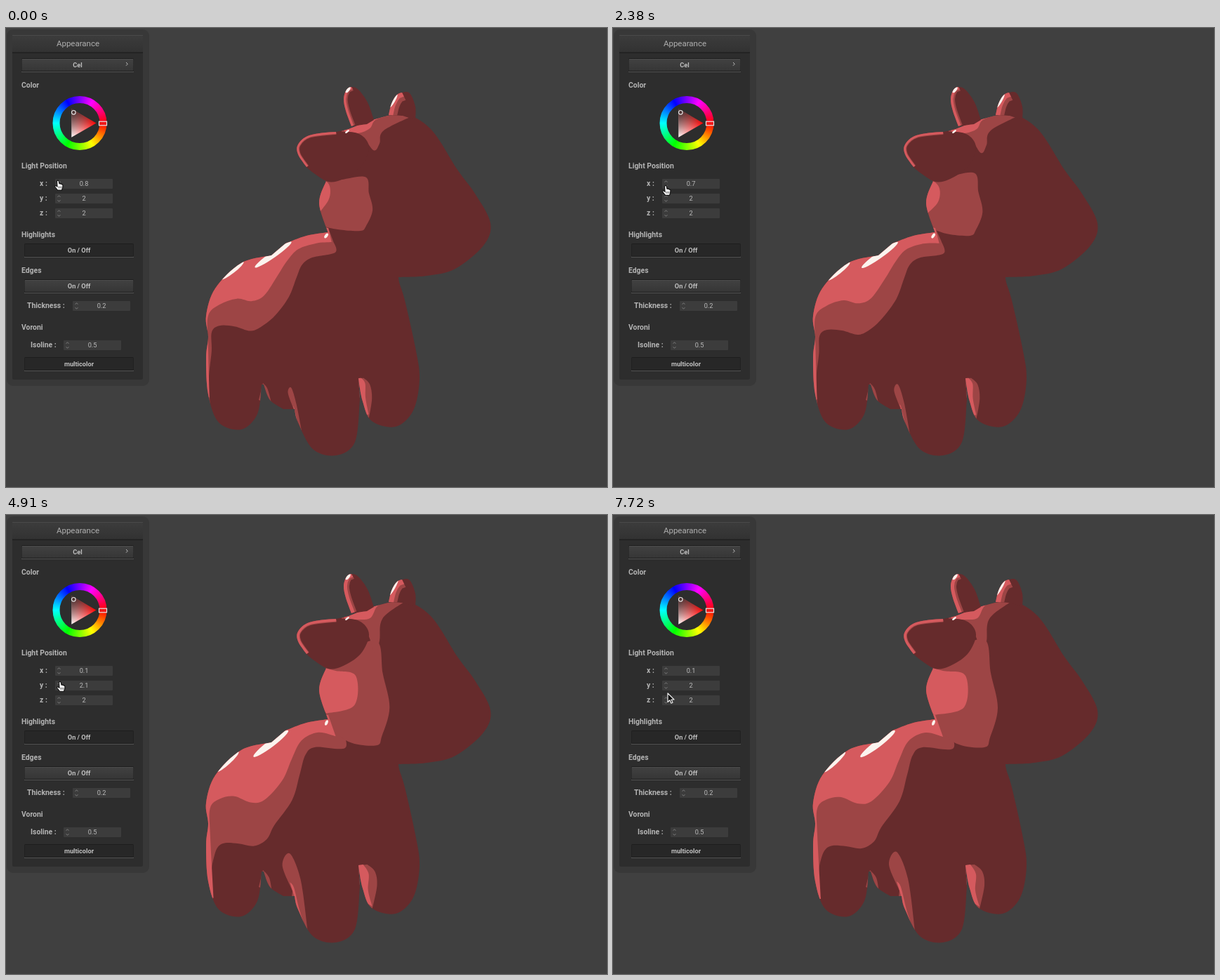
These frames come from a looping animation (856 px wide and 654 px high, 8000 ms). An HTML page with a canvas:

```html
<!DOCTYPE html>
<html lang="en">
<head>
<meta charset="utf-8">
<title>Cel shading</title>
<style>
html, body { margin: 0; width: 100%; height: 100%; overflow: hidden; background: #404040; }
canvas { display: block; }
</style>
</head>
<body>
<canvas id="stage" width="856" height="654"></canvas>
<script>
const ctx = document.getElementById('stage').getContext('2d');
const LOOP = 8000;
const DARK = '#662b2c', MID = '#9d4545', LIGHT = '#d55a5e', WHITE = '#fbf3ee';

// Each click on a spinner arrow changes its value by 0.1
const xUp = [450, 750, 900];
const xDown = [1790, 2090, 2240, 2380, 2520, 2820, 2970, 3420, 3720, 3870];
const yUp = [4910, 5350, 5500, 5790];
const yDown = [6830, 6980, 7130, 7280];
const clicks = (times, t) => times.filter(time => time <= t).length;
const spinner = (value, up, down, t) => (value * 10 + clicks(up, t) - clicks(down, t)) / 10;

// [time, x, y]
const cursorPath = [[1050, 74, 217], [1350, 75, 224], [4170, 75, 225], [4760, 77, 237],
  [5940, 77, 239], [6680, 77, 245], [7430, 77, 245], [7720, 78, 254]];
const mix = (a, b, k) => a.map((v, i) => v + (b[i] - v) * k);

function cursorAt(t) {
  const next = cursorPath.findIndex(key => key[0] > t);
  if (next < 1) return cursorPath.at(next).slice(1);
  const a = cursorPath[next - 1], b = cursorPath[next];
  return mix(a, b, (t - a[0]) / (b[0] - a[0])).slice(1);
}

const points = text => text.trim().split(/\s+/).map(p => p.split(',').map(Number));

// Catmull-Rom through every point of an open run
function curve(path, p) {
  for (let i = 0; i < p.length - 1; i++) {
    const a = p[i - 1] || p[i], b = p[i], c = p[i + 1], d = p[i + 2] || c;
    path.bezierCurveTo(b[0] + (c[0] - a[0]) / 6, b[1] + (c[1] - a[1]) / 6,
      c[0] - (d[0] - b[0]) / 6, c[1] - (d[1] - b[1]) / 6, c[0], c[1]);
  }
}
// Smooth runs separated by "/" meet in corners
function outline(text) {
  const path = new Path2D();
  text.split('/').map(points).forEach((run, i) => {
    path[i ? 'lineTo' : 'moveTo'](...run[0]);
    curve(path, run);
  });
  return path;
}

const torso = outline(`456,218 428,198 415,170 432,153 470,148 488,144 / 521,131 566,123 605,144 643,202 668,236
  690,278 680,310 640,343 600,353 559,355 / 459,292 446,250 456,218`);
torso.addPath(outline(`459,291 / 540,290 / 559,350 560,362 568,388 583,455 589,500 580,545 555,568 521,560 508,532 502,500 /
  504,530 497,590 470,609 437,600 416,562 411,543 / 395,543 376,530 367,508 / 364,508 358,550 335,572 303,562 288,522
  285,470 288,440 285,410 298,371 335,335 378,324 / 398,307 428,296 459,291`));

// Parts in front: the outline starts with the lit edge
function part(edge, rest) {
  return { edge: outline(edge), body: outline(edge + ' ' + rest) };
}
const ear1 = part('492,140 484,118 481,101 485,88 492,84', '502,88 515,106 524,131 / 514,137 492,140');
const ear2 = part('545,124 549,108 556,96 564,92', '575,93 583,112 583,131 / 565,125 545,124');
const brow = part('428,198 416,180 416,166 432,153 470,148', '503,151 517,170 505,198 478,216 456,218 428,198');

// Shaded areas slide from their place at light x = 1 to that at x = 0.1; "close" completes them off the model
const areas = [
  { color: MID, ease: 1.2, close: '459,285 430,280 270,300 270,546',
    from: '291,546 288,500 292,455 291,425 302,415 324,416 348,423 366,415 385,401 402,378 413,352 421,336 436,326 466,317 463,303',
    to: '295,547 293,510 297,488 303,476 313,471 332,472 354,475 372,465 382,445 408,408 419,370 427,342 441,331 484,333 480,305' },
  { color: MID, ease: .8, close: '440,260',
    from: '450,215 466,228 504,227 508,240 511,253 502,268 494,271 470,271 452,276',
    to: '450,215 490,190 530,178 538,225 548,275 537,317 529,331 490,326 457,300' },
  { color: MID, close: '560,118 480,132',
    from: '478,148 505,152 523,167 532,160 538,146 582,126',
    to: '478,148 512,165 526,200 532,180 536,148 566,124' },
  { color: MID, close: '400,592 405,560',
    from: '410,545 404,526 407,522 412,542 421,582',
    to: '408,535 393,498 404,480 420,518 430,592' },
  { color: MID, close: '512,552 504,528 502,499',
    from: '508,499 516,508 519,528 515,556',
    to: '515,498 526,508 529,528 522,562' },
  { color: MID, close: '360,530', from: '366,506 372,514 379,538', to: '366,506 375,517 379,538' },
  { color: LIGHT, close: '459,285 430,280 270,300 270,546',
    from: '288,520 287,450 287,408 304,391 330,381 350,383 368,373 386,343 399,326 415,313 440,306 462,302',
    to: '296,547 291,455 291,418 305,405 325,402 348,411 368,408 394,380 407,350 421,322 445,310 470,316' },
  { color: LIGHT, ease: 1.6, close: '440,260',
    from: '445,215 457,220 458,232 455,243 446,260',
    to: '445,215 470,222 502,229 500,274 457,285' },
  { color: LIGHT, close: '540,115 480,135',
    from: '482,149 503,150 518,142 526,131 555,123',
    to: '482,149 500,149 519,147 529,130 545,123' },
  { color: LIGHT, close: '411,590 411,545',
    from: '410,543 411,546 414,560 418,575',
    to: '404,522 410,530 418,562 427,590' },
  { color: LIGHT, close: '512,552 504,528 502,499',
    from: '505,499 510,505 511,525 515,548',
    to: '509,498 517,512 516,535 522,558' }
];
for (const area of areas) for (const key of ['from', 'to', 'close']) area[key] = points(area[key]);

// Highlights: [center x, center y, half length, half width, angle]
const highlights = [
  { from: [324.5, 344, 20, 3.5, -.64], to: [315.5, 352, 21, 3.8, -.75] },
  { from: [381.5, 322, 32, 4.3, -.6], to: [377, 326, 31, 5, -.65] },
  { from: [456, 296, 4, 2, -.9], to: [456.5, 296, 4, 2, -1.2] }
];

function shape({ from, to, close, ease = 1 }, k) {
  const eased = Math.sign(k) * Math.abs(k) ** ease;
  const p = from.map((q, i) => mix(q, to[i], eased));
  const path = new Path2D();
  path.moveTo(...p[0]);
  curve(path, p);
  close.forEach(q => path.lineTo(...q));
  return path;
}

function fill(path, color) {
  ctx.fillStyle = color;
  ctx.fill(path);
}
function ellipse(x, y, length, width, angle) {
  ctx.fillStyle = WHITE;
  ctx.beginPath();
  ctx.ellipse(x, y, length, width, angle, 0, 7);
  ctx.fill();
}

function drawPart({ edge, body }, midWidth, lightWidth, shine) {
  fill(body, DARK);
  ctx.save();
  ctx.clip(body);
  for (const [width, color] of [[midWidth, MID], [lightWidth, LIGHT]]) {
    ctx.strokeStyle = color;
    ctx.lineWidth = 2 * width;
    ctx.stroke(edge);
  }
  if (shine) ellipse(...shine);
  ctx.restore();
}

function drawModel(x, y) {
  // Raising the light darkens the model like moving it sideways
  const k = (1 - x - (y - 2) / 2) / .9;
  fill(torso, DARK);
  ctx.save();
  ctx.clip(torso);
  areas.forEach(area => fill(shape(area, k), area.color));
  highlights.forEach(({ from, to }) => ellipse(...mix(from, to, k)));
  ctx.restore();
  drawPart(ear1, 5 + 3 * k, 3 + 2 * k, [487, 88, 5, 2.3, -.9]);
  drawPart(ear2, 12, 6 + k, [552, 104, 10 + 3 * k, 2, -1.05]);
  drawPart(brow, 3.5 + k, 2.5 + k);
  ellipse(486, 147.5, 3.5, 1.4, -.7);
}

function box(x, y, w, h, color, radius = 0) {
  ctx.fillStyle = color;
  ctx.beginPath();
  ctx.roundRect(x, y, w, h, radius);
  ctx.fill();
}
function label(text, x, y, size = 10.4, weight = 700, align = 'left', color = '#b4b4b4') {
  ctx.font = `${weight} ${size}px Roboto, sans-serif`;
  ctx.textAlign = align;
  ctx.fillStyle = color;
  ctx.fillText(text, x, y);
}
function line(color, width, ...p) {
  ctx.strokeStyle = color;
  ctx.lineWidth = width;
  ctx.beginPath();
  p.forEach(q => ctx.lineTo(...q));
  ctx.stroke();
}
function vertical(y, h, top, bottom) {
  const g = ctx.createLinearGradient(0, y, 0, y + h);
  g.addColorStop(0, top);
  g.addColorStop(1, bottom);
  return g;
}
function button(text, x, y, pushed) {
  const w = 182 - x;
  box(x, y, w, 19, '#1d1d1d', 2);
  box(x, y + 19, w, 1, '#545454');
  box(x + .5, y + 1, w - 1, 17, pushed ? '#272727' : vertical(y, 18, '#424242', '#363636'), 1);
  if (!pushed) box(x + 1, y + 1, w - 2, 1, '#4c4c4c');
  label(text, x + w / 2, y + 13, 9.2, 700, 'center', '#c0c0c0');
}
function field(text, x, y) {
  box(x, y, 82, 14, '#3c3c3c', 1);
  for (const [dy, s] of [[4.5, -1.5], [9.5, 1.5]])
    line('#858585', .9, [x + 3.5, y + dy], [x + 5.5, y + dy + s], [x + 7.5, y + dy]);
  label(text, x + 41, y + 10.4, 9.2, 400, 'center', '#bdbdbd');
}

function drawWheel() {
  const cx = 105, cy = 135.5, r = 23.5;
  const hues = ctx.createConicGradient(0, cx, cy);
  for (let i = 0; i <= 6; i++) hues.addColorStop(i / 6, `hsl(${i * 60}, 100%, 50%)`);
  ctx.strokeStyle = hues;
  ctx.lineWidth = 10;
  ctx.beginPath();
  ctx.arc(cx, cy, 33.5, 0, 7);
  ctx.stroke();

  const [hue, white, black] = [0, 1, 2].map(i => {
    const angle = i * Math.PI * 2 / 3;
    return [cx + r * Math.cos(angle), cy + r * Math.sin(angle)];
  });
  const triangle = outline([hue, white, black].join('/'));
  const tint = ctx.createLinearGradient(...hue, ...white);
  tint.addColorStop(0, '#f00');
  tint.addColorStop(1, '#fff');
  fill(triangle, tint);
  const shade = ctx.createLinearGradient(...black, ...mix(hue, white, .5));
  shade.addColorStop(0, '#2b2626');
  shade.addColorStop(1, 'rgba(43,38,38,0)');
  fill(triangle, shade);

  ctx.strokeStyle = '#e4e4e4';
  ctx.lineWidth = 1.2;
  ctx.beginPath();
  ctx.arc(96.3, 120.3, 2.8, 0, 7);
  ctx.stroke();
  box(132, 133, 12, 6, '#f21818');
  ctx.strokeRect(132.5, 133.2, 11, 5.6);
}

function drawPanel(x, y) {
  box(1, 2, 203, 508, '#383838', 9);
  box(9, 10, 186, 491, '#2d2d2d', 2);
  box(9, 10, 186, 25, vertical(10, 25, '#3c3c3c', '#323232'), 2);
  box(9, 10, 186, 1, '#4a4a4a');
  box(9, 34.5, 186, 1.2, '#1c1c1c');
  label('Appearance', 102.5, 26, 11.5, 400, 'center', '#b0b0b0');
  button('Cel', 22, 43);
  line('#c0c0c0', 1, [171, 49], [173.3, 51.3], [171, 53.6]);

  label('Color', 22, 85);
  drawWheel();
  label('Light Position', 22, 200);
  [['x :', x], ['y :', y], ['z :', 2]].forEach(([name, value], i) => {
    label(name, 48, 225 + 21 * i);
    field(String(value), 70, 215 + 21 * i);
  });
  label('Highlights', 22, 298);
  button('On / Off', 26, 307, true);
  label('Edges', 22, 349);
  button('On / Off', 26, 358);
  label('Thickness :', 30, 399);
  field('0.2', 95, 389);
  label('Voroni', 22, 430);
  label('Isoline :', 35, 455);
  field('0.5', 82, 445);
  button('multicolor', 26, 469, true);
}

const hand = new Path2D('M-1.5 1Q0-.8 1.2 1L2 5Q3.2 4 4 5.3Q5.2 4.6 5.7 6Q7 5.6 7 7.5L6.5 11L5.5 14H-.5L-4 9.5Q-5.2 7.5-3.3 7.5L-1 9Z');
const arrow = new Path2D('M0 0V12.5L3 9.8L4.9 14.2L7 13.3L5.1 9H9Z');

function drawCursor(t) {
  const pointing = t < 7720;
  const icon = pointing ? hand : arrow;
  ctx.save();
  ctx.translate(...cursorAt(t));
  ctx.lineJoin = 'round';
  ctx.lineWidth = 1.2;
  ctx.strokeStyle = pointing ? '#111' : '#f0f0f0';
  fill(icon, pointing ? '#fff' : '#0a0a0a');
  ctx.stroke(icon);
  if (pointing) for (const dx of [.8, 2.7, 4.6]) line('#222', .7, [dx, 8.5], [dx, 11.5]);
  ctx.restore();
}

function draw(t) {
  const x = spinner(.8, xUp, xDown, t), y = spinner(2, yUp, yDown, t);
  box(0, 0, 856, 654, '#404040');
  drawModel(x, y);
  drawPanel(x, y);
  drawCursor(t);
}

const start = performance.now();
function frame() {
  draw((performance.now() - start) % LOOP);
  requestAnimationFrame(frame);
}
frame();
</script>
</body>
</html>
```
